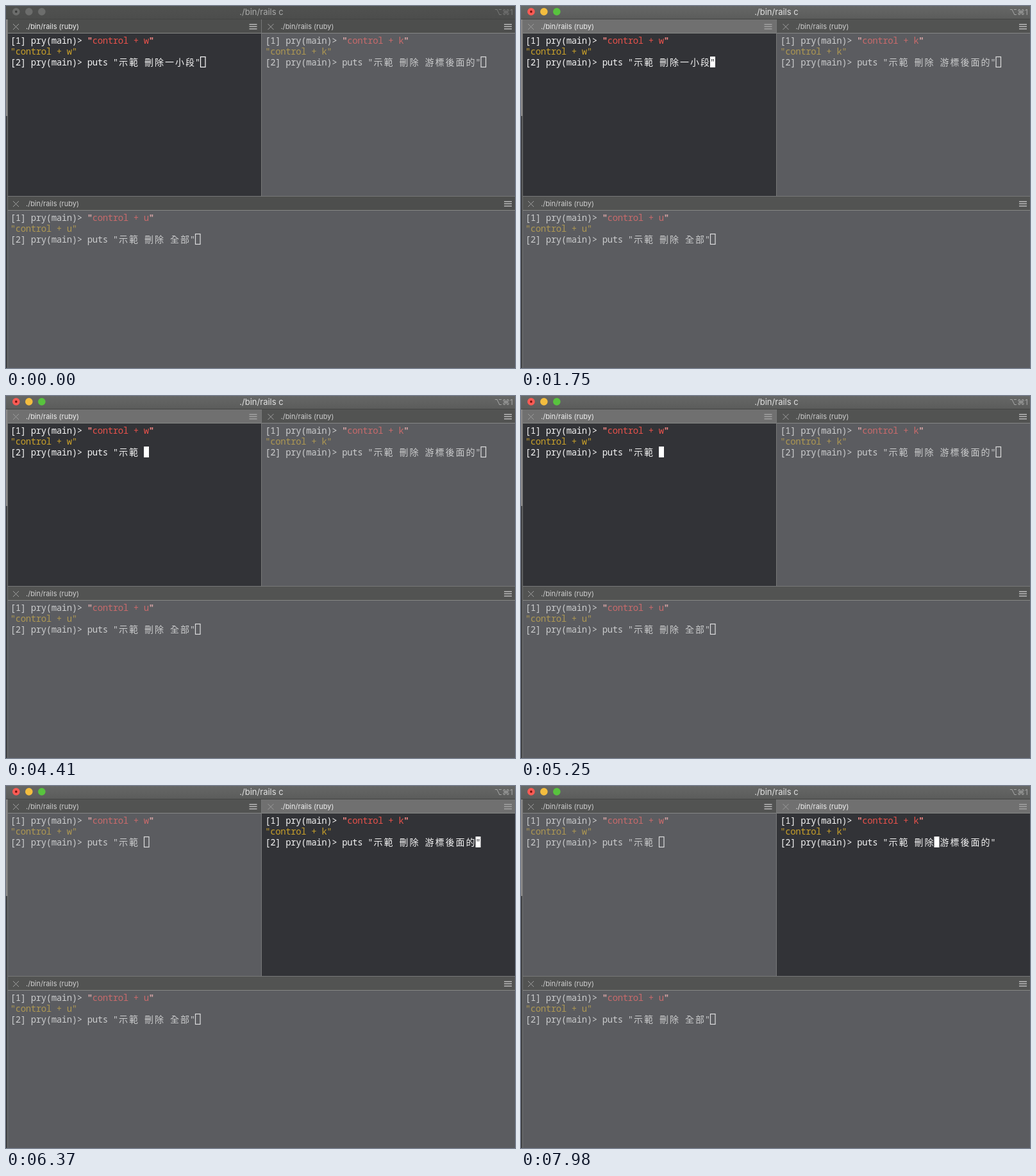
Animation, 794 px wide and 566 px high, one loop 8000 ms. Source, as an HTML page with a canvas:

```html
<!DOCTYPE html>
<html lang="zh-Hant">
<head>
<meta charset="utf-8">
<style>
  html, body { margin: 0; width: 100%; height: 100%; overflow: hidden; background: #5b5c60; }
  canvas { display: block; }
</style>
</head>
<body>
<canvas id="stage" width="794" height="566"></canvas>
<script>
const ctx = document.getElementById('stage').getContext('2d');
const LOOP = 8000, CELL = 8, LINE = 17;
const MONO = '14px "Noto Sans Mono", "Noto Sans CJK TC", "Noto Sans CJK JP", "Noto Sans CJK", monospace';
const UI = 'Inter, "DejaVu Sans", sans-serif';

// Moments in ms
const POINTER_IN = 70, CLICK = 560, RELEASE = 770;
const WIGGLE = 1750, DELETE_WORD = 4200, SWITCH = 5320, MOVE_LEFT = 6300;
const KEY = 140, PRESSES = 6, LEFT_PRESSES = 7;

const BRIGHT = { bg: '#323337', text: '#f4f4f4', quote: '#ee8583', red: '#e8514b', gold: '#c8a02a' };
const DIM = { bg: '#5b5c60', text: '#cbcccd', quote: '#d3a2a3', red: '#c96a6b', gold: '#ae9852' };

const PANES = [
  { x: 3, y: 21, w: 395, h: 276, textX: 7, menuX: 379.5, key: 'w' },
  { x: 399, y: 21, w: 395, h: 276, textX: 404.5, menuX: 777, key: 'k' },
  { x: 3, y: 298, w: 791, h: 268, textX: 7, menuX: 777, key: 'u' }
];

const clamp = (v, lo, hi) => Math.min(hi, Math.max(lo, v));
const cells = ch => ch > '\u2e80' ? 2 : 1;

// Number of key presses made since a moment, up to max
const pressed = (t, since, max) => clamp(Math.floor((t - since) / KEY) + 1, 0, max);

function rect(x, y, w, h, color) {
  ctx.fillStyle = color;
  ctx.fillRect(x, y, w, h);
}

function circle(x, y, r, color, stroke) {
  ctx.beginPath();
  ctx.arc(x, y, r, 0, Math.PI * 2);
  ctx[stroke ? 'strokeStyle' : 'fillStyle'] = color;
  stroke ? ctx.stroke() : ctx.fill();
}

function path(color, width, ...lines) {
  ctx.strokeStyle = color;
  ctx.lineWidth = width;
  ctx.beginPath();
  for (const [x1, y1, x2, y2] of lines) {
    ctx.moveTo(x1, y1);
    ctx.lineTo(x2, y2);
  }
  ctx.stroke();
}

function label(str, x, y, size, color, align = 'left') {
  ctx.font = `${size}px ${UI}`;
  ctx.textAlign = align;
  ctx.fillStyle = color;
  ctx.fillText(str, x, y);
}

// Writes on the character grid and returns the next free x
function write(str, x, y, color, weight = '') {
  ctx.font = `${weight} ${MONO}`;
  ctx.textAlign = 'center';
  ctx.fillStyle = color;
  for (const ch of str) {
    const w = cells(ch) * CELL;
    ctx.fillText(ch, x + w / 2, y);
    x += w;
  }
  return x;
}

function drawTab(p, lit, focused) {
  const { x, y, w, textX, menuX } = p, on = lit && focused;
  rect(x, y, w, 22, on ? '#707070' : focused ? '#525352' : '#4d4e4d');
  rect(x, y + 21, w, 1, '#868786');
  const cx = textX + 8.5, cy = y + 11.5, r = 4.5;
  path(on ? '#9b9b9b' : '#a0a0a0', 1,
    [cx - r, cy - r, cx + r, cy + r], [cx - r, cy + r, cx + r, cy - r]);
  label('./bin/rails (ruby)', textX + 24, y + 15, 11, lit ? '#f0f0f0' : '#cfcfcf');
  for (const dy of [7, 10.5, 14]) rect(menuX, y + dy, 12, 1.5, on ? '#a2a2a2' : '#b9b9b9');
}

function drawPane(p, line, caret, lit, focused) {
  const c = lit ? BRIGHT : DIM, x = p.textX, top = p.y + 38;
  rect(p.x, p.y, p.w, p.h, c.bg);
  drawTab(p, lit, focused);

  let end = write('[1] pry(main)> ', x, top, c.text);
  end = write('"', end, top, c.quote, 'bold');
  end = write(`control + ${p.key}`, end, top, c.red);
  write('"', end, top, c.quote, 'bold');
  write(`"control + ${p.key}"`, x, top + LINE, c.gold);

  const y = top + 2 * LINE;
  const start = write('[2] pry(main)> ', x, y, c.text);
  write(line, start, y, c.text);

  const cx = start + [...line].slice(0, caret).reduce((sum, ch) => sum + cells(ch) * CELL, 0);
  const under = line[caret] || ' ', w = cells(under) * CELL;
  if (lit && focused) {
    rect(cx, y - 14, w, LINE, '#ffffff');
    write(under, cx, y, BRIGHT.bg);
  } else {
    ctx.strokeStyle = lit ? '#ffffff' : '#dededf';
    ctx.lineWidth = 1.2;
    ctx.strokeRect(cx + .5, y - 13.5, w - .5, LINE - 1);
  }
}

function drawTitle(focused) {
  const g = ctx.createLinearGradient(0, 0, 0, 20);
  g.addColorStop(0, focused ? '#666766' : '#505150');
  g.addColorStop(1, focused ? '#5b5c5b' : '#4c4d4c');
  rect(0, 0, 794, 20, g);
  rect(0, 20, 794, 1, '#434443');
  const lights = focused ? ['#fb5b55', '#f3bd3f', '#58c33e'] : ['#6c6d6c', '#6c6d6c', '#6c6d6c'];
  lights.forEach((color, i) => circle(15.8 + 20 * i, 8.9, 5.8, color));
  circle(15.8, 8.9, 1.8, focused ? '#74130f' : '#393a39');
  label('./bin/rails c', 398.5, 14, 13, focused ? '#e2e2e2' : '#a9aaa9', 'center');
  label('⌥⌘1', 791, 13.5, 12, focused ? '#a5a6a5' : '#777877', 'right');
}

// The pointer glides up, clicks, rests, and hides once a key is pressed
function drawPointer(t) {
  const left = (1 - clamp((t - POINTER_IN) / (CLICK - POINTER_IN), 0, 1)) ** 2;
  const x = 308 + 30 * left, y = 210 + 150 * left;
  if (t >= CLICK && t < RELEASE) {
    ctx.lineWidth = 1;
    circle(x, y, 17.5, '#e2e2e3', true);
    circle(x, y, 15.5, '#bfbfc1', true);
  }
  const beam = [
    [x, y - 7, x, y + 7], [x - 2.5, y, x + 2.5, y],
    [x, y - 7, x - 4, y - 9], [x, y - 7, x + 4, y - 9],
    [x, y + 7, x - 4, y + 9], [x, y + 7, x + 4, y + 9]
  ];
  path('#f2f2f2', 3.2, ...beam);
  path('#202124', 1.2, ...beam);
}

function draw(t) {
  const focused = t >= CLICK, active = t < SWITCH ? 0 : 1;
  const lines = [
    t < DELETE_WORD ? 'puts "示範 刪除一小段"' : 'puts "示範 ',
    'puts "示範 刪除 游標後面的"',
    'puts "示範 刪除 全部"'
  ];
  const carets = lines.map(line => line.length);
  carets[0] += pressed(t, WIGGLE + PRESSES * KEY, PRESSES) - pressed(t, WIGGLE, PRESSES);
  carets[1] -= pressed(t, MOVE_LEFT, LEFT_PRESSES);

  rect(0, 0, 794, 566, '#777878');
  rect(0, 21, 2, 151, '#8b8988');
  rect(0, 172, 2, 394, '#3e3f41');
  PANES.forEach((p, i) => drawPane(p, lines[i], carets[i], i === active, focused));
  drawTitle(focused);
  if (t >= POINTER_IN && t < WIGGLE) drawPointer(t);
}

function tick() {
  draw(performance.now() % LOOP);
  requestAnimationFrame(tick);
}
tick();
</script>
</body>
</html>
```
